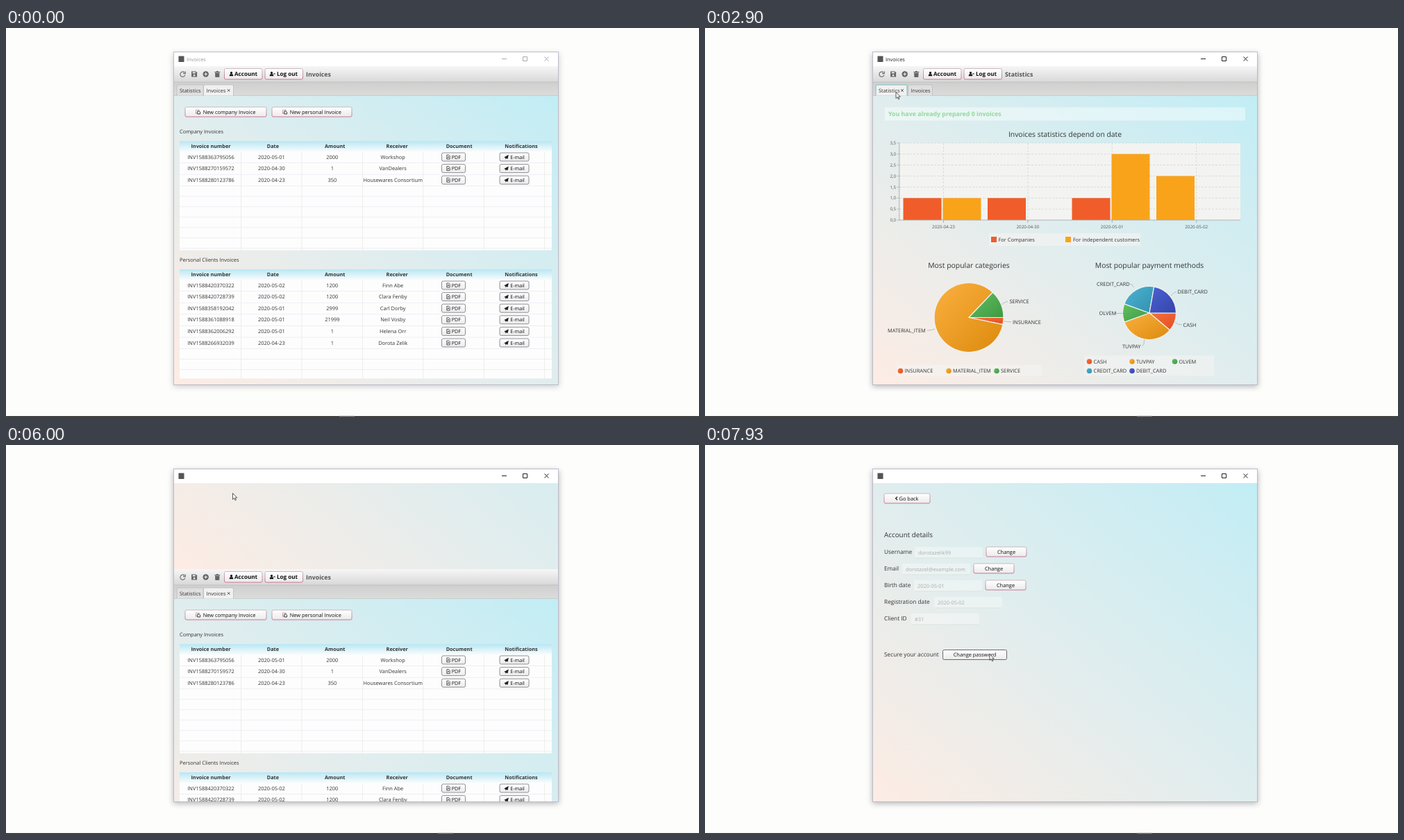
These frames come from a looping animation (998 px wide and 561 px high, 8 s). An HTML page:

```html
<!DOCTYPE html>
<html lang="en">
<head>
<meta charset="utf-8">
<title>Invoices</title>
<style>
  html, body { margin: 0; width: 100%; height: 100%; overflow: hidden; background: #fdfdfc; }
  svg { display: block; font-family: "Open Sans", "Noto Sans", sans-serif; text-rendering: geometricPrecision; }
  .btn rect { fill: url(#face); stroke: url(#edge); stroke-width: .9; }
  .btn.small rect { stroke: #74747c; stroke-width: .8; }
  .btn.hover rect { stroke: #5c5c68; }
  .tab { fill: #dfdfdf; stroke: #bcbcbc; stroke-width: .8; }
  .tab.selected { fill: #f0f1f0; }
  .focused .tab.selected { stroke: #58b9bd; }
  .line { fill: none; stroke: #a5aaaa; stroke-width: .7; }
</style>
</head>
<body>
<svg id="stage" width="998" height="561" viewBox="0 0 998 561"></svg>
<script>
const stage = document.getElementById('stage');

// Drawing helpers; text is placed by its vertical centre.
const rect = (x, y, w, h, fill, more = '') =>
  `<rect x="${x}" y="${y}" width="${w}" height="${h}" fill="${fill}" ${more}/>`;
const path = (d, more = '') => `<path d="${d}" ${more}/>`;
const circle = (x, y, r, fill) => `<circle cx="${x}" cy="${y}" r="${r}" fill="${fill}"/>`;
const group = (content, more = '') => `<g ${more}>${content}</g>`;
const text = (x, y, s, { size = 7.45, anchor = 'start', bold = false, fill = '#333' } = {}) =>
  `<text x="${x}" y="${y + size * .36}" font-size="${size}" text-anchor="${anchor}"
    font-weight="${bold ? 700 : 400}" fill="${fill}">${s}</text>`;
const centred = (x, y, s, options) => text(x, y, s, { anchor: 'middle', ...options });
const gradient = (id, colors, direction = 'x2="0" y2="1"') =>
  `<linearGradient id="${id}" ${direction}>${colors.map((c, i) =>
    `<stop offset="${i / (colors.length - 1)}" stop-color="${c}"/>`).join('')}</linearGradient>`;

const stroke = (color, width = 1) => `fill="none" stroke="${color}" stroke-width="${width}"`;
const icons = {
  user: circle(0, -1.6, 1.6, '#111') + path('M-2.7 3V1.8Q-2.7 0 0 0T2.7 1.8V3Z', 'fill="#111"'),
  logout: circle(-1, -1.6, 1.6, '#111') + path('M-3.7 3V1.8Q-3.7 0-1 0T1.7 1.8V3Z', 'fill="#111"') +
    path('M1.8-.2H4.2', stroke('#111', 1.1)),
  copy: rect(-3, -3, 4.4, 5, '#222') + path('M-.6-1.2H1.6L3 .2V3H-.6Z', 'fill="#fff" stroke="#222" stroke-width=".9"'),
  pdf: path('M-2.2-3H.8L2.2-1.6V3H-2.2ZM-1.1 1.6L0-.8L1.1 1', stroke('#333', .8)),
  plane: path('M3.3-3.2L-3.3.4L-1.4 1.2L-1.1 3.2L.2 1.9L2.1 2.7Z', 'fill="#222"'),
  back: path('M1-2.4L-1.4 0L1 2.4', stroke('#111', 1.2)),
  refresh: path('M2.7-2.2A3.6 3.6 0 1 0 3.5 1.2M3.8-4V-.9H.6', stroke('#6a6a6a', 1.1)),
  save: path('M-4-4H2.3L4-2.3V4H-4Z', 'fill="#666"') + rect(-2.3, -3, 4, 2, '#eee') + circle(0, 1.7, 1.3, '#eee'),
  add: circle(0, 0, 4.2, '#666') + path('M-2.3 0H2.3M0-2.3V2.3', stroke('#eee', 1.2)),
  trash: path('M-4-3.6H4V-2.4H-4ZM-1.3-4.5H1.3V-3.6H-1.3ZM-3.3-1.9H3.3L2.9 4.5H-2.9Z', 'fill="#666"'),
};
const icon = (name, x, y) => group(icons[name], `transform="translate(${x} ${y})"`);

function button(x, y, w, h, label, { image, imageX, textX, id = '', kind = '', ...style } = {}) {
  const caption = textX
    ? text(textX, y + h / 2, label, { fill: '#111', ...style })
    : centred(x + w / 2, y + h / 2, label, { fill: '#111', ...style });
  return group(rect(x, y, w, h, '', 'rx="2"') + (image ? icon(image, imageX, y + h / 2) : '') + caption,
    `class="btn ${kind}" id="${id}"`);
}

function tabs(list) {
  return list.map(([label, x, w, closeX]) =>
    path(`M${x} 97.5V84Q${x} 82 ${x + 2} 82H${x + w - 2}Q${x + w} 82 ${x + w} 84V97.5`, `class="tab ${closeX ? 'selected' : ''}"`) +
    text(x + 4, 90, label) +
    (closeX ? path(`M${closeX - 1.8} 88.2l3.6 3.6m0-3.6l-3.6 3.6`, stroke('#444', .9)) : '')).join('');
}

function table(top, rows) {
  const height = 157.5, bottom = top + height;
  const headers = ['Invoice number', 'Date', 'Amount', 'Receiver', 'Document', 'Notifications'];
  let out = rect(250, top, 536, height, '#fdfdfd') + rect(250, top, 536, 16, 'url(#header)');
  out += headers.map((h, i) => centred(295 + i * 89.4, top + 7.5, h, { size: 7.3, bold: true })).join('');
  for (let i = 0; i < 6; i++) out += rect(338.2 + i * 87.4, top + 16, .8, height - 16, '#e9ece2');
  for (let i = 1, y = top + 15; ; i++) {
    y += i <= rows.length ? 16.6 : 15;
    if (y > bottom - 2) break;
    out += rect(250, y - .4, 536, .8, '#ececf4');
  }
  rows.forEach((row, i) => {
    const y = top + 23 + i * 16.6;
    row.forEach((cell, j) => out += centred(295 + j * 87.4, y, cell));
    out += button(627.5, y - 6, 34, 12, 'PDF', { image: 'pdf', imageX: 637, textX: 641.7, kind: 'small', size: 7.2 });
    out += button(711, y - 6, 42, 12, 'E-mail', { image: 'plane', imageX: 720.5, textX: 726.3, kind: 'small', size: 7.2 });
  });
  return out;
}

function pie(cx, cy, r, slices) {
  const point = degrees => {
    const a = degrees * Math.PI / 180;
    return `${cx + r * Math.cos(a)} ${cy + r * Math.sin(a)}`;
  };
  const total = slices.reduce((sum, s) => sum + s[0], 0);
  let angle = 0;
  return slices.map(([share, color]) => {
    const sweep = share / total * 360, start = point(angle);
    angle += sweep;
    return path(`M${cx} ${cy}L${start}A${r} ${r} 0 ${+(sweep > 180)} 1 ${point(angle)}Z`,
      `fill="url(#${color})" stroke="#f0f2ee" stroke-width="1.2" stroke-linejoin="round"`);
  }).join('');
}

const legend = items => items.map(([x, y, color, label]) =>
  circle(x, y, 3.8, `url(#${color})`) + text(x + 6, y, label)).join('');

function barChart() {
  const base = 277, unit = 31.75, red = '#f05d2a', amber = '#f9a31b';
  let out = centred(518.5, 153, 'Invoices statistics depend on date', { size: 10.4 }) + rect(280, 166, 491, 111, '#f3f4f1');
  for (let i = 0; i <= 7; i++) {
    const y = base - i * unit / 2;
    out += path(`M280 ${y}H771`, stroke('#d4d6d2', .8) + ' stroke-dasharray="3 2"');
    out += path(`M276.5 ${y}H280`, stroke('#999', .7));
    out += text(275, y, (i / 2).toFixed(1).replace('.', ','), { size: 6.2, anchor: 'end', fill: '#555' });
    for (let k = 1; k < 5 && i < 7; k++) out += path(`M278 ${y - k * unit / 10}H280`, stroke('#bbb', .5));
  }
  ['2020-04-23', '2020-04-30', '2020-05-01', '2020-05-02'].forEach((date, i) => {
    const x = 343.5 + i * 121.4;
    out += path(`M${x} 166V277`, stroke('#d4d6d2', .8) + ' stroke-dasharray="3 2"');
    out += path(`M${x} 277V281`, stroke('#999', .7));
    out += centred(x, 287, date, { size: 6.3, fill: '#555' });
  });
  const bars = [[285.5, 1, red], [342.5, 1, amber], [407, 1, red], [528.5, 1, red], [585.5, 3, amber], [650, 2, amber]];
  out += bars.map(([x, v, color]) => rect(x, base - v * unit, 55, v * unit, color)).join('');
  out += path('M280 166V277H771', stroke('#aaa', .8));
  out += rect(409, 296, 218, 18, '#f4f5f3', 'opacity=".65"');
  out += rect(412, 301, 8, 8, red) + text(422.5, 305, 'For Companies');
  return out + rect(519, 301, 8, 8, amber) + text(530, 305, 'For independent customers');
}

const heading = s => text(432, 66.5, s, { size: 8.8, bold: true, fill: '#555' });

const invoicesPage = heading('Invoices') +
  tabs([['Statistics', 246, 38], ['Invoices', 284.5, 43, 320.7]]) +
  button(258, 114, 117, 14, 'New company Invoice', { image: 'copy', imageX: 276.5, textX: 283.7 }) +
  button(383, 114, 115, 14, 'New personal Invoice', { image: 'copy', imageX: 401.5, textX: 408.7 }) +
  text(250, 149, 'Company Invoices') +
  table(163, [
    ['INV1588363795056', '2020-05-01', '2000', 'Workshop'],
    ['INV1588270159572', '2020-04-30', '1', 'VanDealers'],
    ['INV1588280123786', '2020-04-23', '350', 'Housewares Consortium'],
  ]) +
  text(250, 334, 'Personal Clients Invoices') +
  table(348, [
    ['INV1588420370322', '2020-05-02', '1200', 'Finn Abe'],
    ['INV1588420728739', '2020-05-02', '1200', 'Clara Fenby'],
    ['INV1588358192042', '2020-05-01', '2999', 'Carl Dorby'],
    ['INV1588361088918', '2020-05-01', '21999', 'Neil Vosby'],
    ['INV1588362006292', '2020-05-01', '1', 'Helena Orr'],
    ['INV1588266932039', '2020-04-23', '1', 'Dorota Zelik'],
  ]);

const statisticsPage = heading('Statistics') +
  tabs([['Statistics', 246, 45, 284], ['Invoices', 292.5, 35]]) +
  rect(259, 114.5, 519, 19, '#fff', 'opacity=".4"') +
  text(264, 124, 'You have already prepared 0 invoices', { size: 8.8, bold: true, fill: '#8edb97' }) +
  barChart() +
  centred(380, 342, 'Most popular categories', { size: 10.4 }) +
  pie(380, 417.5, 50, [[1, 'red'], [26, 'amber'], [4, 'green']]) +
  path('M427 399L431 396L436 394.5M430 423L441 424M331 434L326 435.5L320 436', 'class="line"') +
  text(438.5, 394.5, 'SERVICE') + text(443, 424, 'INSURANCE') + text(263, 436, 'MATERIAL_ITEM') +
  rect(276, 486, 209, 16, '#f4f5f3', 'opacity=".6"') +
  legend([[281.5, 494.5, 'red', 'INSURANCE'], [351, 494.5, 'amber', 'MATERIAL_ITEM'], [420, 494.5, 'green', 'SERVICE']]) +
  centred(640, 342, 'Most popular payment methods', { size: 10.4 }) +
  pie(640, 411, 38.5, [[1, 'red'], [3, 'amber'], [1, 'green'], [2, 'cyan'], [2, 'blue']]) +
  path('M617 374L615 370L612 369M671 386L675 382L679 380.5M677 424L681 427L687 428M632.5 449L632 456L629 459.5M602 411.5H590', 'class="line"') +
  text(564, 369, 'CREDIT_CARD') + text(680.5, 380, 'DEBIT_CARD') + text(688.5, 428, 'CASH') +
  text(601, 459.5, 'TUVPAY') + text(567.5, 411.5, 'OLVEM') +
  rect(546, 472.5, 187, 29, '#f4f5f3', 'opacity=".6"') +
  legend([[553.5, 481, 'red', 'CASH'], [615, 481, 'amber', 'TUVPAY'], [676.5, 481, 'green', 'OLVEM'],
    [553.5, 494.5, 'cyan', 'CREDIT_CARD'], [615, 494.5, 'blue', 'DEBIT_CARD']]);

const field = (y, label, x, value, buttonX) =>
  text(258, y, label, { size: 8.3 }) +
  rect(x, y - 7, 98, 16, '#fff', 'opacity=".3" rx="2"') + rect(x + 1, y + 8.6, 96, .7, '#d3dcd8') +
  text(x + 5, y + 1, value, { fill: '#a8aeab' }) +
  (buttonX ? button(buttonX, y - 7, 58, 14, 'Change') : '');

const accountPage = rect(242, 55, 553, 459, 'url(#page)') +
  button(258, 70, 66, 14, 'Go back', { image: 'back', imageX: 276, textX: 279.5 }) +
  text(258, 129, 'Account details', { size: 9.9 }) +
  field(154, 'Username', 302, 'dorotazelik99', 405) +
  field(178, 'Email', 284, 'dorotazel@example.com', 387) +
  field(202, 'Birth date', 301, '2020-05-01', 404) +
  field(226, 'Registration date', 330, '2020-05-02') +
  field(250, 'Client ID', 297, '#31') +
  text(258, 302.5, 'Secure your account', { size: 8.3 }) +
  button(342.5, 295.5, 92, 14, 'Change password', { id: 'password' });

const toolbar = rect(242, 55, 553, 23, 'url(#toolbar)') +
  ['refresh', 'save', 'add', 'trash'].map((name, i) => icon(name, 254.5 + i * 16.6, 66.5)).join('') +
  button(314.5, 58.5, 54.5, 15.5, 'Account', { image: 'user', imageX: 324.5, textX: 329, id: 'account', size: 8.1, bold: true }) +
  button(373, 58.5, 54.5, 15.5, 'Log out', { image: 'logout', imageX: 383.5, textX: 390, size: 8.1, bold: true }) +
  rect(242, 78, 553, 20, 'url(#tabbar)') + rect(242, 77.6, 553, .8, '#bcbcbc') + rect(242, 97.2, 553, .8, '#bccbcb');

const diagonal = 'x1="0" y1="1" x2="1" y2="0"', shade = 'x2="1" y2="1"';
stage.innerHTML = `<defs>
  ${gradient('page', ['#fdece4', '#e0edee', '#c2edf5'], diagonal)}
  ${gradient('face', ['#ffffff', '#ebebeb'])}
  ${gradient('edge', ['#c4b4b8', '#c8688a'])}
  ${gradient('toolbar', ['#f6f6f6', '#d8d8d8'])}
  ${gradient('tabbar', ['#cfcfcf', '#dcdcdb'])}
  ${gradient('header', ['#b8e7f4', '#fdfdfd'])}
  ${gradient('red', ['#f8703c', '#e24e20'], shade)}
  ${gradient('amber', ['#fbb040', '#dc8a0c'], shade)}
  ${gradient('green', ['#62c062', '#3f9842'], shade)}
  ${gradient('cyan', ['#4bb4d2', '#338fae'], shade)}
  ${gradient('blue', ['#4c62d0', '#3444ac'], shade)}
  <clipPath id="client">${rect(242, 55, 553, 459, '#000')}</clipPath>
  <filter id="blur" x="-10%" y="-10%" width="120%" height="120%"><feGaussianBlur stdDeviation="4"/></filter>
</defs>` +
  rect(0, 0, 998, 561, '#fdfdfc') + rect(0, 559.8, 998, 1.2, '#111') + rect(480, 559.8, 22, 1.2, '#555', 'id="task"') +
  rect(241, 37, 555, 480, '#74747c', 'id="shadow" filter="url(#blur)"') +
  rect(241.5, 34.5, 554, 480, '#fff', 'stroke="#bcbcc8"') +
  rect(248.5, 40.5, 8, 8.5, '#555') +
  group(text(260, 45, 'Invoices', { size: 7.4, fill: 'currentColor' }), 'id="caption"') +
  group(path('M714 44.5H721M744.5 41.5H750.5V47.5H744.5ZM775.5 41.5L781.5 47.5M781.5 41.5L775.5 47.5', stroke('currentColor')), 'id="controls"') +
  group(
    group(rect(242, 55, 553, 459, '#eee') + rect(242, 98, 553, 416, 'url(#page)') + toolbar +
      group(invoicesPage, 'id="invoices"') + group(statisticsPage, 'id="statistics"'), 'id="main"') +
    group(accountPage, 'id="details"'), 'clip-path="url(#client)"') +
  path('M0 0V9L2.1 7.1L3.6 10.3L4.9 9.7L3.5 6.6H6.3Z', 'id="cursor" fill="#fff" stroke="#333" stroke-width=".8"');

const part = {};
for (const node of stage.querySelectorAll('[id]')) part[node.id] = node;

const LOOP = 8000, ACTIVATED = 1740, OPEN_STATISTICS = 1860, OPEN_INVOICES = 4330;
const OPEN_ACCOUNT = 5849, SLIDE_TIME = 480, PAGE_HEIGHT = 459;
const cursorStops = [
  [0, 491, 575], [120, 491, 575], [850, 400, 260], [1650, 275, 92.5], [3400, 275, 92.5], [4150, 302, 89.5],
  [4600, 302, 89.5], [5300, 324.5, 70], [5600, 324.5, 70], [5850, 326.5, 69.5], [6750, 326.5, 69.5], [7750, 410, 301.5], [LOOP, 410, 301.5],
];

function cursorAt(t) {
  const i = cursorStops.findIndex(stop => stop[0] > t);
  const [t0, x0, y0] = cursorStops[i - 1], [t1, x1, y1] = cursorStops[i];
  const k = (t - t0) / (t1 - t0), e = k * k * (3 - 2 * k);
  return [x0 + (x1 - x0) * e, y0 + (y1 - y0) * e];
}

// Accelerates for the first fifth, brakes for the last fifth.
function easeBoth(k) {
  k = Math.min(1, Math.max(0, k));
  if (k < .2) return 3.125 * k * k;
  if (k > .8) return 1 - 3.125 * (1 - k) ** 2;
  return 1.25 * k - .125;
}

const show = (node, on) => node.style.display = on ? '' : 'none';

function draw(now) {
  const t = now % LOOP;
  const active = t >= ACTIVATED, account = t >= OPEN_ACCOUNT;
  const statistics = t >= OPEN_STATISTICS && t < OPEN_INVOICES;
  // Whole pixels keep the text sharp while the pages slide.
  const slide = Math.round(PAGE_HEIGHT * easeBoth((t - OPEN_ACCOUNT) / SLIDE_TIME));
  const [x, y] = cursorAt(t);

  part.shadow.setAttribute('opacity', active ? .55 : .38);
  part.task.setAttribute('x', active ? 622 : 480);
  part.caption.style.color = active ? '#222' : '#999';
  part.controls.style.color = active ? '#222' : '#aaa';
  show(part.caption, !account);
  show(part.invoices, !statistics);
  show(part.statistics, statistics);
  part.main.classList.toggle('focused', t >= OPEN_STATISTICS && !account);
  part.main.setAttribute('transform', `translate(0 ${slide})`);
  part.details.setAttribute('transform', `translate(0 ${slide - PAGE_HEIGHT})`);
  part.account.classList.toggle('hover', !account && x > 314 && x < 369 && y > 58 && y < 74);
  part.password.classList.toggle('hover', account && x > 342 && y > 295);
  part.cursor.setAttribute('transform', `translate(${x} ${y})`);
  requestAnimationFrame(draw);
}
requestAnimationFrame(draw);
</script>
</body>
</html>
```
